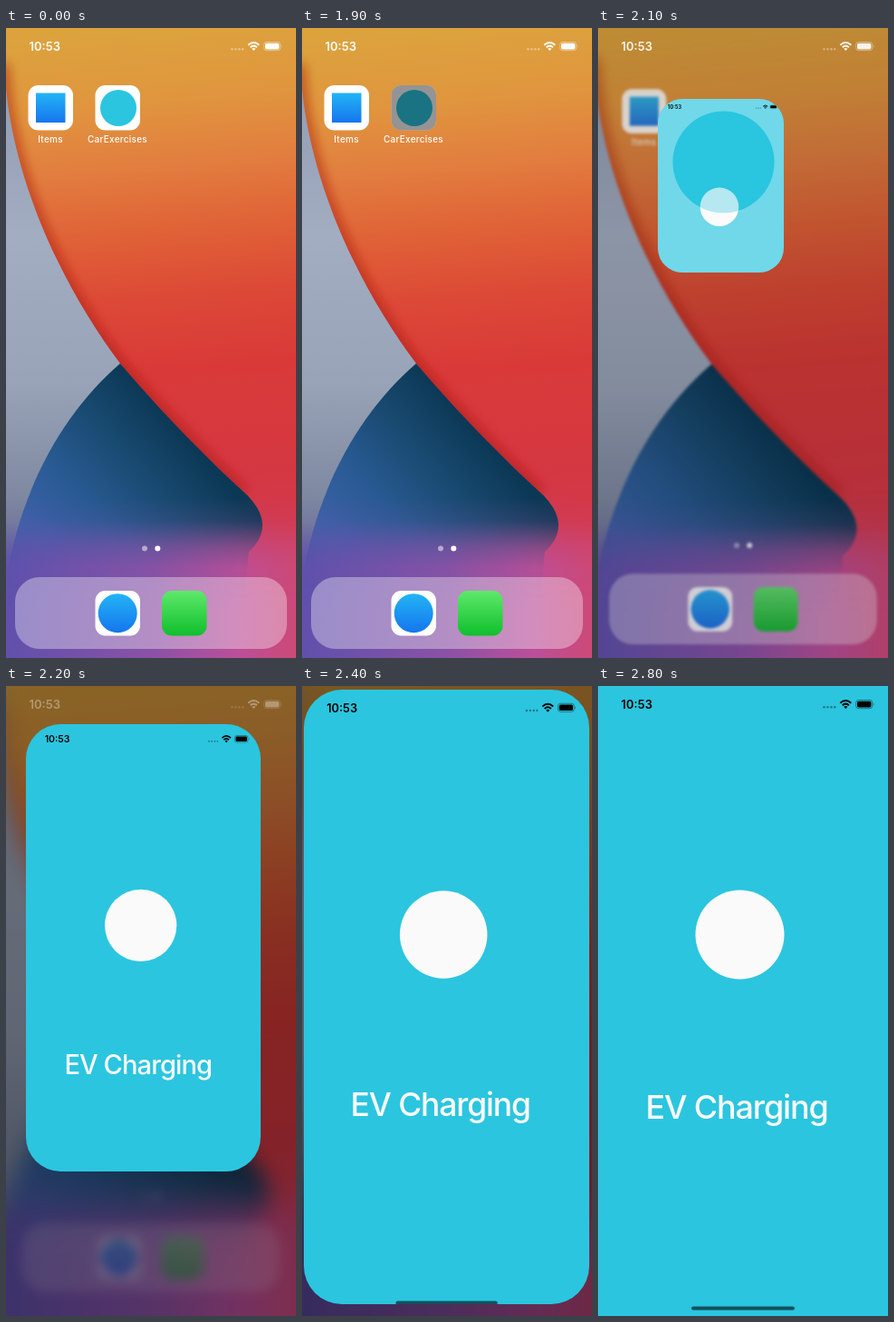
Write an HTML page that moves like this. It is 320 px wide and 693 px high and loops after 8500 ms.

```html
<!DOCTYPE html>
<html lang="en">
<head>
<meta charset="utf-8">
<title>App launch</title>
<style>
  html, body { margin: 0; width: 100%; height: 100%; overflow: hidden; background: #000; }
  #stage { position: relative; width: 320px; height: 693px; overflow: hidden; }
  #stage > *, #window > svg { position: absolute; left: 0; top: 0; }
  svg { display: block; overflow: visible; }
  #wallpaper, #home { transform-origin: 160px 346.5px; }
  #dim { width: 100%; height: 100%; background: #000; }
  #window { overflow: hidden; background: #2bc5df; }
  #screen { transform-origin: 0 0; }
  text { font-family: Inter, Roboto, sans-serif; }
  .label { font-size: 10px; font-weight: 500; letter-spacing: .25px; text-anchor: middle; fill: #fff; }
  .clock { font-size: 13px; font-weight: 600; }
  .title { font-size: 36px; font-weight: 500; letter-spacing: -.032em; text-anchor: middle; fill: #fafafa; }
</style>
</head>
<body>
<div id="stage">
  <svg id="wallpaper" width="320" height="693">
    <defs>
      <linearGradient id="grey" x1="0" y1="40" x2="0" y2="580" gradientUnits="userSpaceOnUse">
        <stop offset="0" stop-color="#8f9bb4"/>
        <stop offset=".35" stop-color="#a3adc1"/>
        <stop offset=".65" stop-color="#99a3b7"/>
        <stop offset="1" stop-color="#707b96"/>
      </linearGradient>
      <linearGradient id="sun" x1="130" y1="0" x2="190" y2="693" gradientUnits="userSpaceOnUse">
        <stop offset="0" stop-color="#dca33d"/>
        <stop offset=".12" stop-color="#e0953e"/>
        <stop offset=".22" stop-color="#e27e3f"/>
        <stop offset=".32" stop-color="#e06337"/>
        <stop offset=".43" stop-color="#dc4936"/>
        <stop offset=".54" stop-color="#d93a38"/>
        <stop offset=".72" stop-color="#d53742"/>
        <stop offset="1" stop-color="#cd3f68"/>
      </linearGradient>
      <linearGradient id="sea" x1="40" y1="570" x2="190" y2="440" gradientUnits="userSpaceOnUse">
        <stop offset="0" stop-color="#3c62a8"/>
        <stop offset=".35" stop-color="#285a92"/>
        <stop offset=".7" stop-color="#18496f"/>
        <stop offset="1" stop-color="#0b3855"/>
      </linearGradient>
      <linearGradient id="glow" x1="0" y1="0" x2="320" y2="0" gradientUnits="userSpaceOnUse">
        <stop offset="0" stop-color="#6050ac"/>
        <stop offset=".5" stop-color="#8a52a6"/>
        <stop offset=".8" stop-color="#bb4f9a"/>
        <stop offset="1" stop-color="#cc4977"/>
      </linearGradient>
      <linearGradient id="rise" x1="0" y1="515" x2="0" y2="640" gradientUnits="userSpaceOnUse">
        <stop offset="0" stop-color="#fff" stop-opacity="0"/>
        <stop offset=".22" stop-color="#fff" stop-opacity=".14"/>
        <stop offset=".45" stop-color="#fff" stop-opacity=".68"/>
        <stop offset=".62" stop-color="#fff" stop-opacity=".94"/>
        <stop offset="1" stop-color="#fff"/>
      </linearGradient>
      <mask id="fade" maskUnits="userSpaceOnUse" x="-60" y="500" width="440" height="260">
        <rect x="-60" y="500" width="440" height="260" fill="url(#rise)"/>
      </mask>
      <path id="sail" d="M-2-60V40C3 165 65 288 126 369C165 415 215 467 262 510C290 535 288 558 268 576L250 760H380V-60Z"/>
      <clipPath id="inSail"><use href="#sail"/></clipPath>
      <filter id="soft" filterUnits="userSpaceOnUse" x="-60" y="-60" width="440" height="820">
        <feGaussianBlur stdDeviation="6"/>
      </filter>
    </defs>
    <rect x="-60" y="-60" width="440" height="820" fill="url(#grey)"/>
    <path d="M126 369C68 419 18 498 0 608L-60 760H290V500Z" fill="url(#sea)"/>
    <use href="#sail" fill="url(#sun)"/>
    <path d="M-2 40C3 165 65 288 126 369C165 415 215 467 262 510" fill="none" stroke="#a5160c"
      stroke-width="9" opacity=".65" filter="url(#soft)" clip-path="url(#inSail)"/>
    <rect x="-60" y="500" width="440" height="260" fill="url(#glow)" mask="url(#fade)"/>
  </svg>

  <svg id="home" width="320" height="693">
    <defs>
      <linearGradient id="blue" x1="0" y1="0" x2="0" y2="1">
        <stop offset="0" stop-color="#22b4f5"/><stop offset="1" stop-color="#1576ee"/>
      </linearGradient>
      <linearGradient id="green" x1="0" y1="0" x2="0" y2="1">
        <stop offset="0" stop-color="#5ee96b"/><stop offset="1" stop-color="#0fbf2c"/>
      </linearGradient>
    </defs>
    <rect x="10" y="604" width="300" height="79" rx="27" fill="#fff" opacity=".35"/>
    <circle cx="153" cy="572.5" r="3" fill="#fff" opacity=".5"/>
    <circle cx="167.300" cy="572.5" r="3" fill="#fff"/>
    <rect x="24.500" y="63" width="49.500" height="49.500" rx="11" fill="#fff"/>
    <rect x="33" y="71.500" width="32.500" height="32.500" fill="url(#blue)"/>
    <text class="label" x="49" y="126">Items</text>
    <g id="app">
      <rect x="98.500" y="63" width="49.500" height="49.500" rx="11" fill="#fff"/>
      <circle cx="124" cy="88" r="20" fill="#2bc5df"/>
      <rect id="press" x="98.500" y="63" width="49.500" height="49.500" rx="11" opacity=".42"/>
      <text class="label" x="123" y="126">CarExercises</text>
    </g>
    <rect x="98.500" y="619" width="49.500" height="49.500" rx="11" fill="#fff"/>
    <circle cx="123.200" cy="643.700" r="21.500" fill="url(#blue)"/>
    <rect x="172" y="619" width="49.500" height="49.500" rx="11" fill="url(#green)"/>
  </svg>

  <div id="dim"></div>

  <svg id="status" width="320" height="693" color="#fff">
    <g id="bar" fill="currentColor">
      <text class="clock" x="25.500" y="25">10:53</text>
      <g opacity=".4">
        <circle cx="249.500" cy="23.300" r="1.200"/><circle cx="253.500" cy="23.300" r="1.200"/>
        <circle cx="257.500" cy="23.300" r="1.200"/><circle cx="261.200" cy="23.300" r="1.200"/>
      </g>
      <g fill="none" stroke="currentColor" stroke-width="2">
        <path d="M267.300 18.800Q273.300 13.200 279.300 18.800"/>
        <path d="M269.700 21.200Q273.300 18 276.900 21.200"/>
      </g>
      <path d="M271.200 22.800Q273.300 21.200 275.400 22.800L273.300 25Z"/>
      <rect x="284.700" y="15.500" width="18" height="9.200" rx="2.800" fill="none" stroke="currentColor" opacity=".4"/>
      <rect x="286" y="16.800" width="15.400" height="6.600" rx="1.600"/>
      <path d="M303.800 18.500Q305.300 20 303.800 21.700Z" opacity=".5"/>
    </g>
  </svg>

  <div id="window">
    <svg id="screen" width="320" height="693">
      <circle cx="156.500" cy="273.500" r="49" fill="#fafafa"/>
      <text class="title" x="153" y="476">EV Charging</text>
      <g id="cover">
        <rect width="320" height="693" fill="#fff"/>
        <circle cx="167" cy="160" r="129" fill="#2bc5df"/>
      </g>
      <use href="#bar" color="#000"/>
      <rect x="103" y="682.500" width="114" height="4" rx="2" fill="#12515d"/>
    </svg>
  </div>
</div>

<script>
const LOOP = 8500;
const idle = { blur: 0, zoom: 1, shrink: 1, haze: 0, shown: 1, dim: 0, status: 1, cover: 0 };
const behind = { blur: 16, zoom: 1.1, shrink: .94, haze: 10, shown: .1, dim: .46, status: 0, cover: 0 };

// box: x, y, width, height, corner radius of the opening window
const steps = [
  { at: 0, ...idle },
  { at: 1800, ...idle, press: true },
  { at: 2100, blur: 1.6, zoom: 1.02, shrink: .985, haze: 1.8, shown: .9, dim: .14, status: .9,
    cover: .33, box: [66, 78, 139, 191, 27] },
  { at: 2200, blur: 11, zoom: 1.06, shrink: .95, haze: 6, shown: .45, dim: .38, status: .35,
    cover: 0, box: [22, 42, 259, 492, 38] },
  { at: 2300, ...behind, box: [7, 14, 304, 628, 41] },
  { at: 2400, ...behind, box: [1.8, 4, 315.3, 676, 42] },
  { at: 2500, ...behind, box: [.6, 1.3, 318.6, 688, 42] },
  { at: 2600, ...behind, box: [.2, .4, 319.6, 691.5, 42] },
  { at: 2700, ...behind, box: [0, 0, 320, 693, 0] }
];

const part = id => document.getElementById(id);
const [wallpaper, home, app, press, dim, status, frame, screen, cover] =
  ['wallpaper', 'home', 'app', 'press', 'dim', 'status', 'window', 'screen', 'cover'].map(part);
const blur = px => px ? `blur(${px}px)` : 'none';
const show = (node, on) => { node.style.visibility = on ? 'visible' : 'hidden'; };

function pose(s) {
  wallpaper.style.filter = blur(s.blur);
  wallpaper.style.transform = `scale(${s.zoom})`;
  home.style.filter = blur(s.haze);
  home.style.transform = `scale(${s.shrink})`;
  home.style.opacity = s.shown;
  dim.style.opacity = s.dim;
  status.style.opacity = s.status;
  cover.style.opacity = s.cover;
  show(app, !s.box);
  show(press, s.press);
  show(frame, s.box);
  if (!s.box) return;
  const [x, y, width, height, radius] = s.box;
  Object.assign(frame.style, {
    left: x + 'px', top: y + 'px', width: width + 'px', height: height + 'px', borderRadius: radius + 'px'
  });
  screen.style.transform = `scale(${width / 320})`;
}

const start = performance.now();
let current;
function tick() {
  const time = (performance.now() - start) % LOOP;
  const step = steps.findLast(s => s.at <= time) || steps[0];
  if (step !== current) pose(current = step);
  requestAnimationFrame(tick);
}
tick();
</script>
</body>
</html>
```
